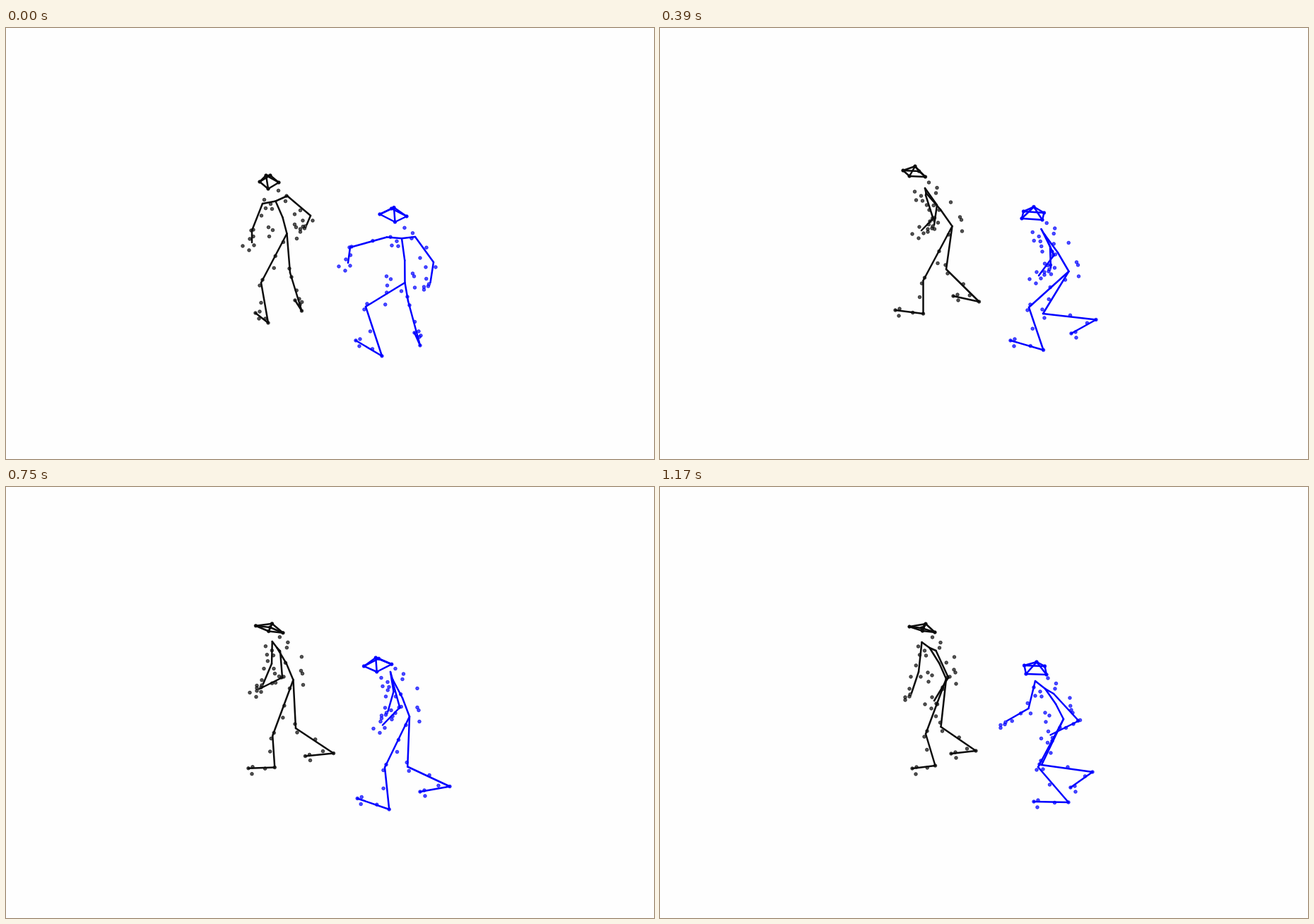
An HTML page without scripts that plays this animation: 917x611 px, repeating every 1.2 s.

```html
<!DOCTYPE html>
<html lang="en">
<head>
<meta charset="utf-8">
<title>Two dancers</title>
<style>
/* Joints: head ring (ha hb hc) and crown (ht); l/r + shoulder, elbow, wrist, knee, heel, toe; hp = hip. */
@property --hax { syntax: "<number>"; inherits: true; initial-value: 0 }
@property --hay { syntax: "<number>"; inherits: true; initial-value: 0 }
@property --hbx { syntax: "<number>"; inherits: true; initial-value: 0 }
@property --hby { syntax: "<number>"; inherits: true; initial-value: 0 }
@property --hcx { syntax: "<number>"; inherits: true; initial-value: 0 }
@property --hcy { syntax: "<number>"; inherits: true; initial-value: 0 }
@property --htx { syntax: "<number>"; inherits: true; initial-value: 0 }
@property --hty { syntax: "<number>"; inherits: true; initial-value: 0 }
@property --lsx { syntax: "<number>"; inherits: true; initial-value: 0 }
@property --lsy { syntax: "<number>"; inherits: true; initial-value: 0 }
@property --lex { syntax: "<number>"; inherits: true; initial-value: 0 }
@property --ley { syntax: "<number>"; inherits: true; initial-value: 0 }
@property --lwx { syntax: "<number>"; inherits: true; initial-value: 0 }
@property --lwy { syntax: "<number>"; inherits: true; initial-value: 0 }
@property --rsx { syntax: "<number>"; inherits: true; initial-value: 0 }
@property --rsy { syntax: "<number>"; inherits: true; initial-value: 0 }
@property --rex { syntax: "<number>"; inherits: true; initial-value: 0 }
@property --rey { syntax: "<number>"; inherits: true; initial-value: 0 }
@property --rwx { syntax: "<number>"; inherits: true; initial-value: 0 }
@property --rwy { syntax: "<number>"; inherits: true; initial-value: 0 }
@property --hpx { syntax: "<number>"; inherits: true; initial-value: 0 }
@property --hpy { syntax: "<number>"; inherits: true; initial-value: 0 }
@property --lkx { syntax: "<number>"; inherits: true; initial-value: 0 }
@property --lky { syntax: "<number>"; inherits: true; initial-value: 0 }
@property --lhx { syntax: "<number>"; inherits: true; initial-value: 0 }
@property --lhy { syntax: "<number>"; inherits: true; initial-value: 0 }
@property --ltx { syntax: "<number>"; inherits: true; initial-value: 0 }
@property --lty { syntax: "<number>"; inherits: true; initial-value: 0 }
@property --rkx { syntax: "<number>"; inherits: true; initial-value: 0 }
@property --rky { syntax: "<number>"; inherits: true; initial-value: 0 }
@property --rhx { syntax: "<number>"; inherits: true; initial-value: 0 }
@property --rhy { syntax: "<number>"; inherits: true; initial-value: 0 }
@property --rtx { syntax: "<number>"; inherits: true; initial-value: 0 }
@property --rty { syntax: "<number>"; inherits: true; initial-value: 0 }

html, body { margin: 0; width: 100%; height: 100%; overflow: hidden; background: #fefefe; }
svg { display: block; width: 100%; height: 100%; }
use { animation: 1.2s steps(8) infinite; }
.lead { --ink: #0c0c0c; animation-name: lead-head, lead-arms, lead-legs; }
.follow { --ink: blue; animation-name: follow-head, follow-arms, follow-legs; }

/* Neck (nk), spine (sp) and the fourth ring point (hd) follow from the other joints. */
.figure {
  --nkx: calc((var(--lsx) + var(--rsx)) / 2 + 1); --nky: calc((var(--lsy) + var(--rsy)) / 2 + 2);
  --spx: calc((var(--nkx) + var(--hpx)) / 2 + 2); --spy: calc((var(--nky) + var(--hpy)) / 2);
  --hdx: calc(var(--hax) + var(--hcx) - var(--hbx)); --hdy: calc(var(--hay) + var(--hcy) - var(--hby));
}
/* A unit line carried from joint a to joint b. */
.bone {
  d: path("M0 0H1"); fill: none; stroke: var(--ink); stroke-width: 2.5; stroke-linecap: round;
  vector-effect: non-scaling-stroke;
  transform: matrix(calc(var(--bx) - var(--ax)), calc(var(--by) - var(--ay)),
    calc(var(--ay) - var(--by)), calc(var(--bx) - var(--ax)), var(--ax), var(--ay));
}
.at { transform: translate(calc(var(--ax) * 1px), calc(var(--ay) * 1px)); }
.mid { transform: translate(calc((var(--ax) + var(--bx)) * .5px), calc((var(--ay) + var(--by)) * .5px)); }
circle { r: 2.3px; fill: var(--ink); stroke: var(--ink); fill-opacity: .7; stroke-opacity: .7; }
.solid circle { fill-opacity: 1; }

.ha { --ax: var(--hax); --ay: var(--hay) } .to-ha { --bx: var(--hax); --by: var(--hay) }
.hb { --ax: var(--hbx); --ay: var(--hby) } .to-hb { --bx: var(--hbx); --by: var(--hby) }
.hc { --ax: var(--hcx); --ay: var(--hcy) } .to-hc { --bx: var(--hcx); --by: var(--hcy) }
.hd { --ax: var(--hdx); --ay: var(--hdy) } .to-hd { --bx: var(--hdx); --by: var(--hdy) }
.ht { --ax: var(--htx); --ay: var(--hty) }
.nk { --ax: var(--nkx); --ay: var(--nky) } .to-sp { --bx: var(--spx); --by: var(--spy) }
.sp { --ax: var(--spx); --ay: var(--spy) } .to-hp { --bx: var(--hpx); --by: var(--hpy) }
.hp { --ax: var(--hpx); --ay: var(--hpy) }
.ls { --ax: var(--lsx); --ay: var(--lsy) } .to-ls { --bx: var(--lsx); --by: var(--lsy) }
.le { --ax: var(--lex); --ay: var(--ley) } .to-le { --bx: var(--lex); --by: var(--ley) }
.lw { --ax: var(--lwx); --ay: var(--lwy) } .to-lw { --bx: var(--lwx); --by: var(--lwy) }
.rs { --ax: var(--rsx); --ay: var(--rsy) } .to-rs { --bx: var(--rsx); --by: var(--rsy) }
.re { --ax: var(--rex); --ay: var(--rey) } .to-re { --bx: var(--rex); --by: var(--rey) }
.rw { --ax: var(--rwx); --ay: var(--rwy) } .to-rw { --bx: var(--rwx); --by: var(--rwy) }
.lk { --ax: var(--lkx); --ay: var(--lky) } .to-lk { --bx: var(--lkx); --by: var(--lky) }
.lh { --ax: var(--lhx); --ay: var(--lhy) } .to-lh { --bx: var(--lhx); --by: var(--lhy) }
.lt { --ax: var(--ltx); --ay: var(--lty) } .to-lt { --bx: var(--ltx); --by: var(--lty) }
.rk { --ax: var(--rkx); --ay: var(--rky) } .to-rk { --bx: var(--rkx); --by: var(--rky) }
.rh { --ax: var(--rhx); --ay: var(--rhy) } .to-rh { --bx: var(--rhx); --by: var(--rhy) }
.rt { --ax: var(--rtx); --ay: var(--rty) } .to-rt { --bx: var(--rtx); --by: var(--rty) }

/* Poses advance every 30 ms. */
@keyframes lead-head {
  0% { animation-timing-function: steps(5); --hax:359; --hay:218; --hbx:371; --hby:228; --hcx:386; --hcy:219; --htx:368; --hty:209 }
  12.5% { --hax:344; --hay:220; --hbx:360; --hby:222; --hcx:370; --hcy:215; --htx:351; --hty:205 }
  32.5% { --hax:344; --hay:202; --hbx:353; --hby:210; --hcx:375.5; --hcy:211; --htx:361; --hty:196 }
  52.5% { --hax:350; --hay:198; --hbx:367.5; --hby:206; --hcx:389; --hcy:208.5; --htx:373; --hty:195 }
  72.5% { animation-timing-function: steps(4); --hax:357; --hay:195.5; --hbx:376; --hby:203; --hcx:395; --hcy:205; --htx:380; --hty:192.5 }
  82.5% { animation-timing-function: steps(6); --hax:357.5; --hay:195.5; --hbx:376; --hby:202.5; --hcx:394; --hcy:204.5; --htx:380; --hty:192 }
  97.5%, 100% { --hax:353; --hay:198; --hbx:371.5; --hby:204; --hcx:389; --hcy:206; --htx:376; --hty:194 }
}
@keyframes lead-arms {
  0% { animation-timing-function: steps(5); --lsx:363; --lsy:249; --lex:348; --ley:287; --lwx:348; --lwy:304; --rsx:398; --rsy:238; --rex:431; --rey:266; --rwx:425.5; --rwy:279 }
  12.5% { --lsx:363.5; --lsy:247; --lex:370.5; --ley:286; --lwx:367; --lwy:306; --rsx:387; --rsy:240.5; --rex:411; --rey:274; --rwx:403; --rwy:297 }
  32.5% { --lsx:376; --lsy:237; --lex:386.5; --ley:270; --lwx:370; --lwy:287; --rsx:375; --rsy:227; --rex:392; --rey:251; --rwx:388; --rwy:279 }
  52.5% { --lsx:386; --lsy:234; --lex:387.5; --ley:270; --lwx:356; --lwy:283; --rsx:375; --rsy:220; --rex:378.5; --rey:248; --rwx:369; --rwy:275 }
  72.5% { animation-timing-function: steps(4); --lsx:390; --lsy:231; --lex:394.5; --ley:270; --lwx:360; --lwy:290; --rsx:378.5; --rsy:218; --rex:373.5; --rey:253; --rwx:359; --rwy:283 }
  82.5% { animation-timing-function: steps(6); --lsx:391; --lsy:231; --lex:401; --ley:270; --lwx:371; --lwy:296; --rsx:377; --rsy:218.5; --rex:370; --rey:257; --rwx:356; --rwy:287 }
  97.5%, 100% { --lsx:390.5; --lsy:232; --lex:408; --ley:270; --lwx:388; --lwy:303; --rsx:370.5; --rsy:220; --rex:366; --rey:262; --rwx:356; --rwy:292 }
}
@keyframes lead-legs {
  0% { animation-timing-function: steps(5); --hpx:397.5; --hpy:291.5; --lkx:361; --lky:361; --lhx:371; --lhy:418; --ltx:353; --lty:404; --rkx:402; --rky:347; --rhx:418.5; --rhy:401; --rtx:409; --rty:386 }
  12.5% { --hpx:419.5; --hpy:293; --lkx:371.5; --lky:363; --lhx:376.5; --lhy:421; --ltx:337; --lty:406; --rkx:400; --rky:345; --rhx:435; --rhy:397; --rtx:409; --rty:381 }
  32.5% { --hpx:413.5; --hpy:281; --lkx:372.5; --lky:358; --lhx:372.5; --lhy:405; --ltx:333; --lty:400; --rkx:405; --rky:342; --rhx:451.5; --rhy:388; --rtx:415; --rty:380 }
  52.5% { --hpx:407; --hpy:275; --lkx:378.5; --lky:354; --lhx:379; --lhy:398; --ltx:341; --lty:399; --rkx:411.5; --rky:342; --rhx:465; --rhy:380; --rtx:424; --rty:382 }
  72.5% { animation-timing-function: steps(4); --hpx:406; --hpy:272; --lkx:376; --lky:351; --lhx:381.5; --lhy:397; --ltx:345; --lty:398.5; --rkx:408.5; --rky:342; --rhx:462; --rhy:375; --rtx:423; --rty:381 }
  82.5% { animation-timing-function: steps(6); --hpx:405.5; --hpy:272; --lkx:375; --lky:349; --lhx:384; --lhy:396; --ltx:349; --lty:398; --rkx:404; --rky:341; --rhx:455; --rhy:375; --rtx:419; --rty:380 }
  97.5%, 100% { --hpx:405; --hpy:272; --lkx:376; --lky:350; --lhx:389.5; --lhy:395; --ltx:357; --lty:399; --rkx:397.5; --rky:340; --rhx:447; --rhy:374; --rtx:412; --rty:378 }
}
@keyframes follow-head {
  0% { animation-timing-function: steps(5); --hax:529; --hay:264; --hbx:550.5; --hby:275; --hcx:567; --hcy:267; --htx:549; --hty:254.5 }
  12.5% { --hax:518; --hay:270.5; --hbx:541; --hby:282; --hcx:556; --hcy:273; --htx:539; --hty:261 }
  32.5% { --hax:512; --hay:270; --hbx:541; --hby:272; --hcx:543.5; --hcy:262; --htx:529; --hty:253.5 }
  52.5% { --hax:507; --hay:254; --hbx:523; --hby:261; --hcx:545.5; --hcy:250; --htx:521.5; --hty:241 }
  72.5% { animation-timing-function: steps(4); --hax:506; --hay:254; --hbx:526.5; --hby:263; --hcx:546; --hcy:252.5; --htx:525; --hty:243 }
  82.5% { animation-timing-function: steps(6); --hax:503; --hay:256; --hbx:521.5; --hby:268; --hcx:543.5; --hcy:259; --htx:523.5; --hty:247.5 }
  97.5%, 100% { --hax:518; --hay:265; --hbx:547; --hby:266; --hcx:544.5; --hcy:254; --htx:533; --hty:248 }
}
@keyframes follow-arms {
  0% { animation-timing-function: steps(5); --lsx:539; --lsy:296.5; --lex:487; --ley:311; --lwx:484; --lwy:333; --rsx:579; --rsy:296; --rex:605; --rey:332; --rwx:600.5; --rwy:361 }
  12.5% { --lsx:539; --lsy:305; --lex:516; --ley:330; --lwx:498; --lwy:353; --rsx:561; --rsy:296.5; --rex:588; --rey:326; --rwx:590.5; --rwy:354 }
  32.5% { --lsx:545; --lsy:294; --lex:557.5; --ley:322; --lwx:536; --lwy:351; --rsx:539.5; --rsy:285; --rex:552; --rey:310; --rwx:553; --rwy:340 }
  52.5% { --lsx:550; --lsy:275; --lex:555; --ley:309; --lwx:532; --lwy:335; --rsx:546; --rsy:261; --rex:548; --rey:287; --rwx:541; --rwy:316 }
  72.5% { animation-timing-function: steps(4); --lsx:546; --lsy:283; --lex:559.5; --ley:316; --lwx:534; --lwy:340; --rsx:542; --rsy:263; --rex:549; --rey:293; --rwx:540; --rwy:320 }
  82.5% { animation-timing-function: steps(6); --lsx:543; --lsy:287; --lex:575; --ley:325; --lwx:541; --lwy:345; --rsx:534; --rsy:271; --rex:538.5; --rey:307; --rwx:524; --rwy:334 }
  97.5%, 100% { --lsx:557; --lsy:293; --lex:592.5; --ley:331.5; --lwx:552.5; --lwy:351.5; --rsx:531; --rsy:275; --rex:521.5; --rey:314; --rwx:491; --rwy:331.5 }
}
@keyframes follow-legs {
  0% { animation-timing-function: steps(5); --hpx:564.5; --hpy:361; --lkx:509; --lky:395; --lhx:532; --lhy:465; --ltx:495; --lty:443; --rkx:569; --rky:387; --rhx:586; --rhy:450; --rtx:578; --rty:432 }
  12.5% { --hpx:575.5; --hpy:361; --lkx:509; --lky:397; --lhx:541.5; --lhy:458; --ltx:495.5; --lty:444.5; --rkx:544; --rky:392; --rhx:603; --rhy:436.5; --rtx:578; --rty:431.5 }
  32.5% { --hpx:578.5; --hpy:345; --lkx:522; --lky:396; --lhx:542.5; --lhy:456.5; --ltx:496; --lty:443; --rkx:542; --rky:405; --rhx:617; --rhy:413.5; --rtx:582; --rty:433 }
  52.5% { --hpx:571.5; --hpy:325; --lkx:538.5; --lky:400; --lhx:540.5; --lhy:457; --ltx:495; --lty:441; --rkx:567.5; --rky:395; --rhx:625.5; --rhy:423; --rtx:584; --rty:431 }
  72.5% { animation-timing-function: steps(4); --hpx:570.5; --hpy:326; --lkx:533.5; --lky:395; --lhx:544; --lhy:457; --ltx:499.5; --lty:442; --rkx:569; --rky:398; --rhx:630.5; --rhy:426; --rtx:588; --rty:433 }
  82.5% { animation-timing-function: steps(6); --hpx:569; --hpy:330; --lkx:526; --lky:394; --lhx:555; --lhy:453; --ltx:507; --lty:443.5; --rkx:568; --rky:403; --rhx:636; --rhy:424; --rtx:595; --rty:433 }
  97.5%, 100% { --hpx:571; --hpy:329; --lkx:535; --lky:397; --lhx:578; --lhy:447; --ltx:529; --lty:446; --rkx:540; --rky:394; --rhx:612; --rhy:404; --rtx:581; --rty:426 }
}
</style>
</head>
<body>
<svg viewBox="0 0 917 611">
  <defs>
    <g id="figure" class="figure">
      <g class="mid ls to-rs">
        <circle cx="5" cy="-13"/><circle cx="16.5" cy="-5.5"/><circle cx="15" cy="2"/><circle cx="-15"/>
        <circle cx="-13" cy="12"/><circle cx="-6" cy="6"/><circle cx="-4" cy="13"/><circle cx="36" cy="15"/>
      </g>
      <g class="at hp">
        <circle cx="11" cy="-13"/><circle cx="13" cy="-9"/><circle cx="14" cy="7"/><circle cx="-5" cy="12"/>
        <circle cx="-26" cy="-9"/><circle cx="-20" cy="-5"/><circle cx="-25" cy="4"/>
      </g>
      <g class="mid ls to-le"><circle cx="6" cy="-2"/></g>
      <g class="at le"><circle cx="2" cy="-1"/><circle cx="-1"/></g>
      <g class="mid le to-lw"><circle cx="2"/></g>
      <g class="at lw"><circle cx="-13" cy="5"/><circle cx="-4" cy="11"/><circle cx="3" cy="4"/><circle cx="-3" cy="-5"/></g>
      <g class="mid rs to-re"><circle cx="-6" cy="12"/></g>
      <g class="at re"><circle cx="3" cy="7"/><circle cx="-11" cy="7"/></g>
      <g class="mid re to-rw"><circle cx="-8" cy="9"/></g>
      <g class="at rw"><circle cx="-2" cy="2"/><circle cx="-9" cy="6"/><circle cx="-9" cy="10"/><circle cx="-3" cy="5"/></g>
      <g class="mid hp to-lk"><circle cx="2" cy="-3"/><circle cy="14"/></g>
      <g class="at lk"><circle cx="-2" cy="4"/><circle cx="2" cy="-4"/></g>
      <g class="mid lk to-lh"><circle cx="-5"/></g>
      <g class="mid lh to-lt"><circle cx="5" cy="1"/></g>
      <g class="at lt"><circle/><circle cx="6" cy="-2"/><circle cx="5" cy="8"/></g>
      <g class="at lh"><circle/></g>
      <g class="at rk"><circle cx="-1" cy="-6"/><circle cx="2" cy="6"/></g>
      <g class="mid rk to-rh"><circle cx="1" cy="-2"/></g>
      <g class="mid rh to-rt"><circle cx="5" cy="-5"/></g>
      <g class="at rt"><circle/><circle cx="6" cy="-2"/><circle cx="7" cy="6"/></g>
      <g class="at rh"><circle/></g>
      <path class="bone nk to-ls"/><path class="bone ls to-le"/><path class="bone le to-lw"/>
      <path class="bone nk to-rs"/><path class="bone rs to-re"/><path class="bone re to-rw"/>
      <path class="bone nk to-sp"/><path class="bone sp to-hp"/>
      <path class="bone hp to-lk"/><path class="bone lk to-lh"/><path class="bone lh to-lt"/>
      <path class="bone hp to-rk"/><path class="bone rk to-rh"/><path class="bone rh to-rt"/>
      <path class="bone ha to-hb"/><path class="bone hb to-hc"/><path class="bone hc to-hd"/><path class="bone hd to-ha"/>
      <path class="bone ht to-ha"/><path class="bone ht to-hb"/><path class="bone ht to-hc"/><path class="bone ht to-hd"/>
      <g class="solid">
        <circle class="at ha"/><circle class="at hb"/><circle class="at hc"/><circle class="at hd"/><circle class="at ht"/>
      </g>
    </g>
  </defs>
  <use class="lead" href="#figure"/>
  <use class="follow" href="#figure"/>
</svg>
</body>
</html>
```
